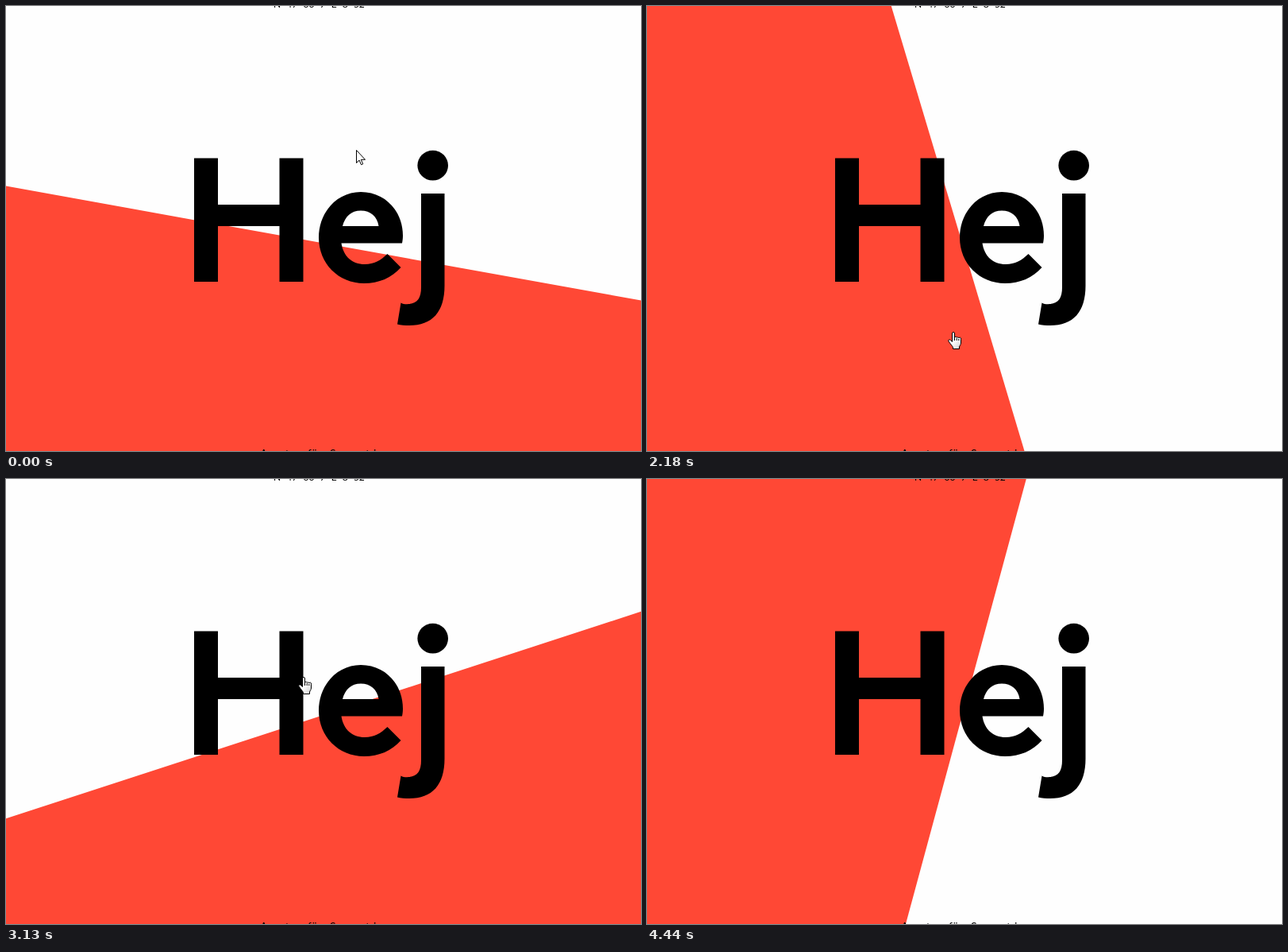
Write an HTML page that moves like this. It is 800x560 px and loops after 4540 ms.

```html
<!DOCTYPE html>
<html lang="de">
<head>
<meta charset="utf-8">
<title>Hej</title>
<style>
  html, body { margin: 0; width: 100%; height: 100%; overflow: hidden; background: #fefefe; }
  svg { display: block; }
  text { font-family: Lato, sans-serif; }
</style>
</head>
<body>
<svg width="800" height="560" viewBox="0 0 800 560">
  <defs>
    <linearGradient id="shade" x2="1" y2="1">
      <stop offset=".5" stop-color="#fff"/>
      <stop offset="1" stop-color="#ccc"/>
    </linearGradient>
  </defs>
  <rect id="half" x="-1000" y="-1000" width="1000" height="2000" fill="#ff4835"/>
  <text x="337" y="2.3" font-size="12" word-spacing="4.1">N 47 00 7 E 8 52</text>
  <text x="320" y="567.8" font-size="14" word-spacing="7">Agentur für Symmetrie</text>

  <g role="img" aria-label="Hej" fill-rule="evenodd">
    <path d="M237 191.5H267V250H344.500V191.500H374.500V347H344.500V277H267V347H237Z"/>
    <path d="M499 298.500H422.500C425 315 436 325 452 325C464 325 472 320 480.500 312L497.500 329
      C486 342 470 349 451 349C419 349 394 324 394 291.500C394 259 417.500 234 447 234
      C477.500 234 500 258 500 289C500 293 499.500 296 499 298.500Z
      M424 277H469.500C468 265 459 257.500 447 257.500C435 257.500 427 265 424 277Z"/>
    <path d="M523 236H552.500V352C552.500 385 537 402 508 402C503 402 497 401.500 493 400.500
      L497.500 373.500C500 375 502 375.300 505 375.300C518 375 523 368 523 354Z"/>
    <ellipse cx="537.7" cy="200.7" rx="19.3" ry="18.9"/>
  </g>

  <path id="arrow" transform="translate(441 181)" fill="#fff" stroke="#000"
    d="M.5 .5V16.500L4 13L6.500 18.700L8.700 17.800L6.300 12.300H11.500Z"/>
  <g id="hand" stroke="#000">
    <path fill="url(#shade)" d="M5.500 12.500V2a1.500 1.500 0 0 1 3 0V7a1.500 1.500 0 0 1 2.700 .3
      1.500 1.500 0 0 1 2.600 .7 1.400 1.400 0 0 1 2.700 1.200V14c0 2-1.500 3.500-2 5v2.500H6.500V19.500
      C5 17 3 15 1 12C0 10.300 2 9.300 3.200 10.300Z"/>
    <path fill="none" d="M8.500 7v4M11.200 8v3M13.800 9v2"/>
  </g>
</svg>
<script>
// Motion is counted in beats: the picture refreshes once per beat
const LOOP = 4540, BEAT = 136, LEAD = 22;
const HAND_IN = 6, DRAG = 13.88, FLICK = 21, HAND_OUT = 26;
const [half, arrow, hand] = ['half', 'arrow', 'hand'].map(id => document.getElementById(id));

// Route of the hand: beat, x, y
const route = [[8, 437, 192], [14, 437, 270], [16, 379, 410], [18, 325, 400],
  [21, 319, 268], [23, 368, 249], [26, 430, 570]];

const clamp = (v, min, max) => Math.min(max, Math.max(min, v));

// Damped spring, from 1 down to 0
const spring = n => Math.exp(-.83 * n) * Math.cos(.6 * n);
const swing = (n, angle) => n > 0 ? angle * (1 - spring(n)) : 0;

// Rest, an even turn while dragged, then two flicks that settle
function turn(beat) {
  return 275.8 + 4.4 * spring(beat)
    + 31.85 * clamp(beat - DRAG, 0, FLICK - DRAG)
    + swing(beat - FLICK, 117.5)
    + swing(beat - HAND_OUT, 114.4);
}

function place(beat) {
  const i = clamp(route.findIndex(p => p[0] > beat), 1, route.length - 1);
  const [a, b] = [route[i - 1], route[i]];
  const p = clamp((beat - a[0]) / (b[0] - a[0]), 0, 1);
  return [1, 2].map(n => Math.round(a[n] + (b[n] - a[n]) * p));
}

function show(el, on) {
  el.style.visibility = on ? 'visible' : 'hidden';
}

const start = performance.now();
function draw() {
  const t = (performance.now() - start) % LOOP;
  const beat = Math.floor((t + LEAD) / BEAT);
  half.setAttribute('transform', `translate(397 298) rotate(${turn(beat)})`);
  hand.setAttribute('transform', `translate(${place(beat)})`);
  show(arrow, beat < HAND_IN);
  show(hand, beat >= HAND_IN && beat < HAND_OUT);
  requestAnimationFrame(draw);
}
draw();
</script>
</body>
</html>
```
